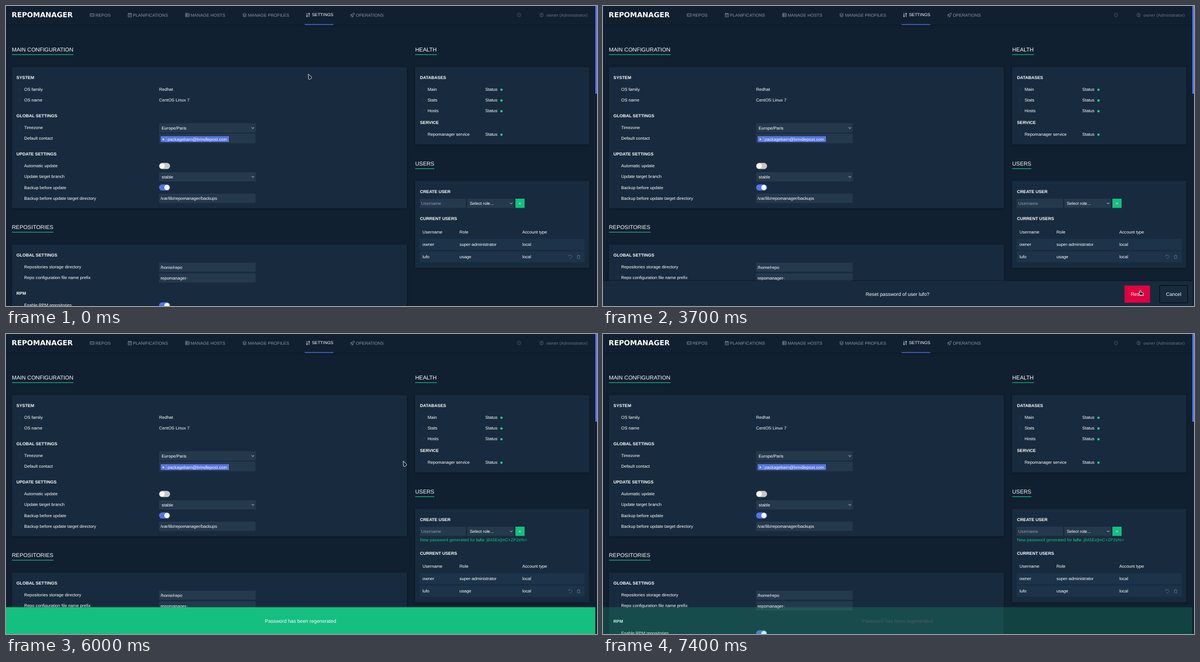
Recreate the animation shown at these times as an HTML page. Size 1050 by 534 pixels, loop 7500 ms.

```html
<!DOCTYPE html>
<html lang="en">
<head>
<meta charset="utf-8">
<title>Settings</title>
<style>
html, body { margin: 0; width: 100%; height: 100%; overflow: hidden; background: #112031; }
svg { display: block; width: 1050px; height: 534px; }
text { font-family: "Liberation Sans", Arial, sans-serif; text-rendering: geometricPrecision; white-space: pre; }
.panel { fill: #182b3e; filter: drop-shadow(0 1.5px 2px rgba(0, 0, 0, .38)); }
.line { fill: none; stroke: #fff; stroke-width: .8; }
</style>
</head>
<body>
<svg id="stage" viewBox="0 0 1050 534"></svg>
<script>
const BODY = 7.656, LARGE = 8.75, HEADING = 9.844;
const GREEN = '#15bf7f', BLUE = '#5473e8', FIELD = '#25394c', ROW = '#1c3349';
const LOOP = 7500, TICK = 100;

// Text is placed by the middle of its capitals.
const text = (x, y, s, { size = BODY, fill = '#fff', extra = '' } = {}) =>
  `<text x="${x}" y="${y + size * .344}" font-size="${size}" fill="${fill}" ${extra}>${s}</text>`;
const bold = (x, y, s) => text(x, y, s, { extra: 'font-weight="bold"' });
const centred = (x, y, s) => text(x, y, s, { size: LARGE, extra: 'text-anchor="middle"' });
const rect = (x, y, w, h, fill, extra = '') =>
  `<rect x="${x}" y="${y}" width="${w}" height="${h}" fill="${fill}" ${extra}/>`;
const circle = (x, y, r, fill, extra = '') =>
  `<circle cx="${x}" cy="${y}" r="${r}" fill="${fill}" ${extra}/>`;
const panel = (x, y, w, h, id = '') =>
  `<rect ${id && `id="${id}"`} class="panel" x="${x}" y="${y}" width="${w}" height="${h}"/>`;
const icon = (x, y, d, opacity = .5, id = '') =>
  `<path ${id && `id="${id}"`} class="line" transform="translate(${x} ${y})" d="${d}" opacity="${opacity}"/>`;
const heading = (x, y, s, width) =>
  text(x, y, s, { size: HEADING }) + rect(x, y + 8, width, 1.1, GREEN);
const label = (x, y, s) =>
  circle(x - 7.5, y, 2.7, 'none', 'stroke="#fff" stroke-width=".6" opacity=".05"') + text(x, y, s);
const input = (y, s) => rect(272, y - 8.2, 171.5, 16.4, FIELD) + text(274.5, y, s);
const chevron = (x, y) =>
  `<path class="line" stroke-width="1.2" d="M${x - 2.2} ${y - 1}l2.2 2.2 2.2-2.2"/>`;
const select = (x, y, w, s) =>
  rect(x, y - 8.2, w, 16.4, FIELD) + text(x + 4.5, y, s) + chevron(x + w - 5, y);
const toggle = (y, on) =>
  rect(272, y - 5.5, 19.5, 11, on ? BLUE : '#c8c8c8', 'rx="5.5"') +
  circle(on ? 285.8 : 277.5, y, 4.6, on ? '#fff' : '#fbfbf4');
const status = (y, s) => label(749, y, s) + text(851.5, y, 'Status') + circle(880.3, y + .5, 2.1, '#24cf8d');

const nav = [
  [149.5, 159, 'REPOS', 'M0-2.5h7M0 0h7M0 2.5h7M0-2.5v5M7-2.5v5'],
  [217, 225.5, 'PLANIFICATIONS', 'M0-2.5h6v6H0zM0-.8h6M1.5-4v2M4.5-4v2M1.5 1.3h3'],
  [319, 328, 'MANAGE HOSTS', 'M0-3h6.5v6H0zM0-1h6.5M0 1h6.5M2-3v6'],
  [420.5, 430, 'MANAGE PROFILES', 'M0-1.5l3.3-1.8 3.3 1.8L3.3.3zM0 .2L3.3 2l3.3-1.8M0 1.8l3.3 1.8 3.3-1.8'],
  [533.5, 543.5, 'SETTINGS', 'M1.3-3.5v7M5-3.5v7M0 1.2l1.3 2 1.3-2M3.7-1.5L5-3.5l1.3 2'],
  [612, 621.5, 'OPERATIONS', 'M2 .5L4-2.5l3-1-.7 3-3 2.5zM2 .5L0 .8l1.2-2 2-.2M3.3 2l-.2 1.7 2-1.2V.8M.2 3.5l1.6-1.6'],
];
const header =
  `<rect class="panel" style="fill:#112031" width="1047" height="33"/>` +
  `<text x="10" y="20.1" font-size="12.5" font-weight="bold" fill="#fff" style="font-family:'DejaVu Sans',sans-serif">REPOMANAGER</text>` +
  nav.map(([ix, x, s, d]) => {
    const active = s === 'SETTINGS';
    return icon(ix, 16, d, active ? .9 : .45) +
      text(x, active ? 15.5 : 16, s, { extra: `opacity="${active ? 1 : .52}"` });
  }).join('') +
  rect(530.5, 32.3, 51, 1.3, BLUE) +
  icon(911.5, 16, 'M-3.2 0a3.2 3.2 0 1 0 6.4 0a3.2 3.2 0 1 0-6.4 0M0-1.8v.6M0-.5v2.3', .25) +
  icon(951.5, 16, 'M-3.2 0a3.2 3.2 0 1 0 6.4 0a3.2 3.2 0 1 0-6.4 0M-2 2.3q2-2 4 0M-1-1a1 1 0 1 0 2 0a1 1 0 1 0-2 0', .25) +
  text(960.3, 16, 'owner (Administrator)', { extra: 'opacity=".36"' });

const main =
  heading(10.5, 78, 'MAIN CONFIGURATION', 109.5) + panel(10.5, 109, 701.5, 251) +
  bold(18.6, 127.5, 'SYSTEM') +
  label(32.2, 148.5, 'OS family') + text(272, 148.5, 'Redhat') +
  label(32.2, 167.7, 'OS name') + text(272, 167.7, 'CentOS Linux 7') +
  bold(18.6, 195.5, 'GLOBAL SETTINGS') +
  label(32.2, 216.5, 'Timezone') + select(272, 217, 171.5, 'Europe/Paris') +
  label(32.2, 235.7, 'Default contact') + rect(272, 227.3, 171.5, 17, FIELD) +
  rect(275.2, 232.2, 120.5, 9.4, BLUE, 'stroke="#7690f2" stroke-width=".6"') +
  rect(284.2, 232.2, .6, 9.4, '#a9b9f6') + bold(277.2, 237.2, '×') +
  text(287, 237, 'packagebarn@brindlepost.com') +
  bold(18.6, 263.5, 'UPDATE SETTINGS') +
  label(32.2, 284.5, 'Automatic update') + toggle(284.8, false) +
  label(32.2, 303.7, 'Update target branch') + select(272, 304, 171.5, 'stable') +
  label(32.2, 322.9, 'Backup before update') + toggle(323.1, true) +
  label(32.2, 342, 'Backup before update target directory') + input(342.3, '/var/lib/repomanager/backups');

const repositories =
  heading(10.5, 394, 'REPOSITORIES', 74) + panel(10.5, 424.5, 701.5, 130) +
  bold(18.6, 443.5, 'GLOBAL SETTINGS') +
  label(32.2, 464.6, 'Repositories storage directory') + input(465, '/home/repo') +
  label(32.2, 483.8, 'Repo configuration file name prefix') + input(484.1, 'repomanager-') +
  bold(18.6, 511.6, 'RPM') +
  label(32.2, 532.5, 'Enable RPM repositories') + toggle(533, true);

const health =
  heading(727, 78, 'HEALTH', 38.8) + panel(727, 109, 309, 137.5) +
  bold(735.5, 127.5, 'DATABASES') +
  status(148.5, 'Main') + status(167.7, 'Stats') + status(186.8, 'Hosts') +
  bold(735.5, 207.6, 'SERVICE') + status(228.6, 'Repomanager service');

const tableRow = (y, cells) => cells.map((s, i) => text([740, 805.8, 917.2][i], y, s)).join('');
const users =
  heading(727, 281, 'USERS', 34) + panel(727, 311, 309, 155, 'usersPanel') +
  bold(735.5, 330.2, 'CREATE USER') +
  rect(735.2, 343, 82, 16.4, FIELD) + text(737.8, 351.2, 'Username', { fill: '#8e99a4' }) +
  select(819.5, 351.2, 83, 'Select role...') +
  rect(905, 343, 16.4, 16.4, GREEN) + text(910.8, 351.6, '+') +
  `<g id="message">` + text(735.5, 366,
    'New password generated for <tspan font-weight="bold">lufo</tspan>: j8A5Ee]mC+ZP2s%=', { fill: GREEN }) + `</g>` +
  `<g id="userList">` + bold(735.5, 378.5, 'CURRENT USERS') +
  tableRow(402, ['Username', 'Role', 'Account type']) +
  rect(735.2, 414.4, 293, 19.7, ROW) + tableRow(424, ['owner', 'super-administrator', 'local']) +
  rect(735.2, 436.3, 293, 19.7, ROW) + tableRow(446, ['lufo', 'usage', 'local']) +
  icon(1002.6, 446.2, 'M-2.5-1.6A3 3 0 1 1-1.5 2.6M-2.9-3.2v2h2', .25, 'resetIcon') +
  icon(1017.3, 446.2, 'M-2.6-1.8h5.2M-1-3h2M-2-1.8v5h4v-5', .3) + `</g>`;

const overlays =
  `<g id="confirm"><rect id="confirmBar" class="panel" style="filter:drop-shadow(0 -1px 1px rgba(0,0,0,.4))" y="486" width="1047" height="60"/>` +
  `<g id="confirmBody">` + centred(523.3, 511, 'Reset password of user lufo?') +
  rect(926.6, 495.7, 45.2, 30.8, '#ff0044', 'id="resetButton" rx="1"') + centred(949.2, 511, 'Reset') +
  rect(989, 495.7, 49.6, 30.8, '#182b3e', 'rx="1" stroke="#05080c"') + centred(1013.8, 511, 'Cancel') +
  `</g></g>` +
  `<g id="alert">` + rect(0, 486.3, 1047, 48, GREEN) + centred(523.3, 511, 'Password has been regenerated') + `</g>` +
  rect(1047, 0, 3, 534, '#112031') + rect(1047, 0, 3, 156, BLUE);

const cursors =
  `<g id="cursor" stroke="#f2f2f2" stroke-width=".9" fill="#141c25" stroke-linejoin="round">` +
  `<path id="arrow" d="M.6.6L6.4 5.8 6.1 8.2 3.3 10.2.9 9.3Z"/>` +
  `<path id="hand" d="M-1 5.6V1Q0-.3 1 1V3.8L4.6 4.6Q5.5 5 5.2 6.2L4.6 9.3H.2L-2.7 6Q-2.6 4.9-1 5.6Z"/></g>`;

const $ = id => document.getElementById(id);
$('stage').innerHTML = main + repositories + health + users + header + overlays + cursors;

// Pointer hot spot: time, x, y
const path = [
  [100, 536.5, 120.5], [900, 992, 424], [1200, 1003, 450.3], [1400, 1003, 450.3],
  [1600, 1005, 448.5], [1700, 1005, 448.5], [1800, 1005.3, 449], [2300, 1005, 448.5],
  [2900, 1005, 448.5], [3700, 954.5, 505.5], [4200, 954.5, 505.5], [5000, 876.5, 379.3],
  [5250, 841.5, 362], [5450, 880, 345.5], [5650, 952, 356], [5800, 931, 384], [6200, 479.5, 67.5],
];
function pointerAt(t) {
  const next = path.findIndex(key => key[0] > t);
  if (next === 0) return path[0].slice(1);
  if (next < 0) return path.at(-1).slice(1);
  const [t0, x0, y0] = path[next - 1], [t1, x1, y1] = path[next];
  let p = (t - t0) / (t1 - t0);
  if (t1 - t0 > 300) p *= p * (3 - 2 * p);
  return [x0 + (x1 - x0) * p, y0 + (y1 - y0) * p];
}

const within = (t, from, to) => t >= from && t < to;
const show = (id, visible) => $(id).setAttribute('visibility', visible ? 'visible' : 'hidden');
const move = (id, x, y) => $(id).setAttribute('transform', `translate(${x} ${y})`);

function draw(t) {
  const regenerated = t >= 3800, shift = regenerated ? 11.5 : 0;
  show('message', regenerated);
  move('userList', 0, shift);
  $('usersPanel').setAttribute('height', 155 + shift);
  $('resetIcon').setAttribute('opacity', within(t, 1500, 3000) ? .55 : .25);

  const collapse = t >= 3700 ? 3.5 : 0;
  show('confirm', within(t, 2700, 3800));
  move('confirmBar', 0, collapse);
  move('confirmBody', 0, collapse / 2);
  $('resetButton').setAttribute('fill', t >= 3500 ? '#e0003f' : '#ff0044');

  show('alert', regenerated);
  $('alert').setAttribute('opacity', Math.min(1, 1 - (t - 6450) / 1220));

  const hand = within(t, 1500, 3100) || within(t, 3500, 4300), visible = t < 6300;
  move('cursor', ...pointerAt(t));
  show('arrow', visible && !hand);
  show('hand', visible && hand);
}

function frame() {
  draw(Math.floor(performance.now() % LOOP / TICK) * TICK);
  requestAnimationFrame(frame);
}
frame();
</script>
</body>
</html>
```
